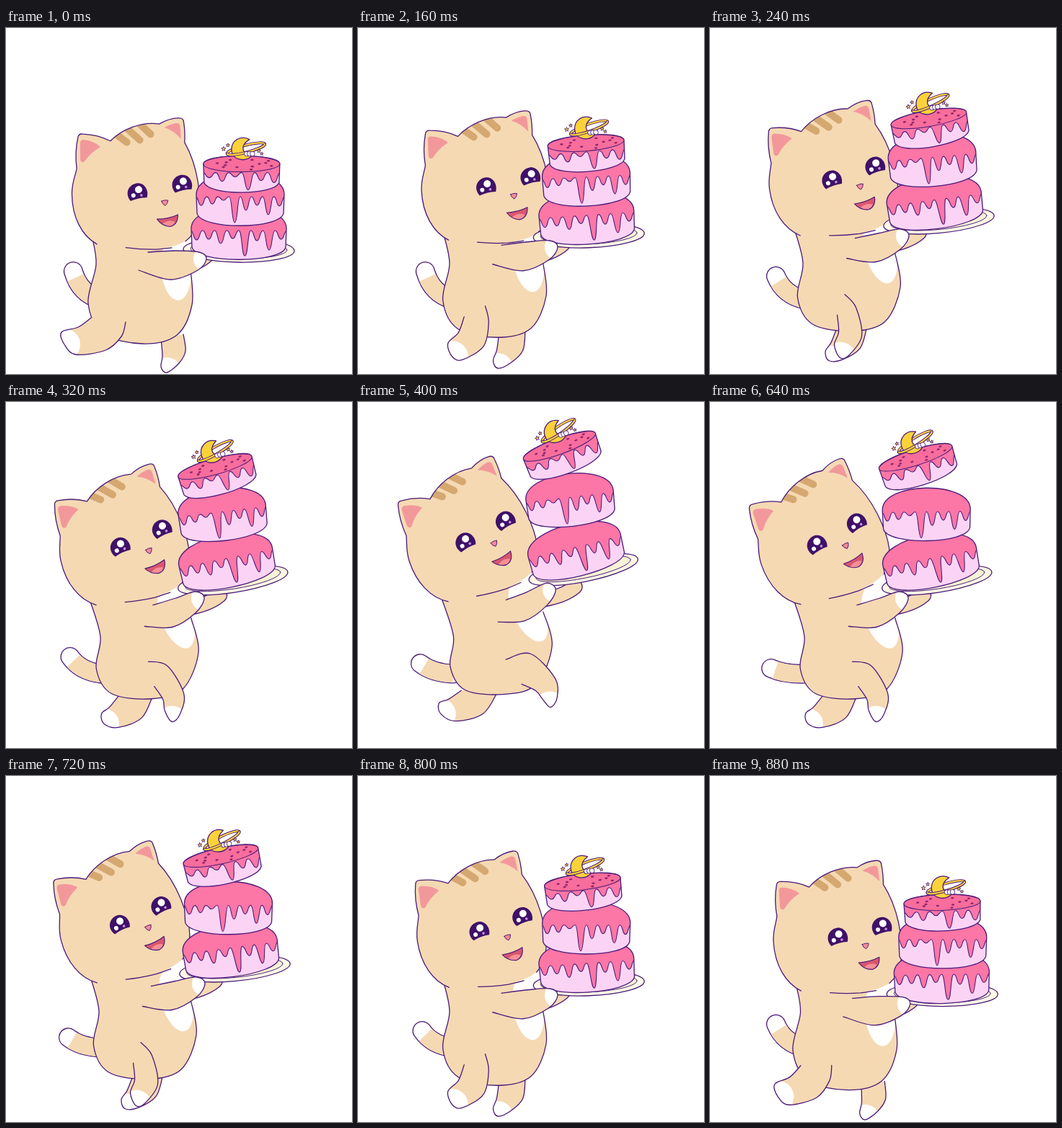
Write an HTML page with a canvas that moves like this. It is 480 by 480 pixels and loops after 960 ms.

```html
<!DOCTYPE html>
<html lang="en">
<head>
<meta charset="utf-8">
<title>Cat with a cake</title>
<style>
  html, body { margin: 0; width: 100%; height: 100%; overflow: hidden; background: #fff; }
  canvas { display: block; width: 480px; height: 480px; }
</style>
</head>
<body>
<canvas id="stage" width="480" height="480"></canvas>
<script>
const g = document.getElementById('stage').getContext('2d');
const INK = '#4a1a78', FUR = '#f5d9b3', PINK = '#fc76a6', SPONGE = '#fbd4f5', GOLD = '#fcd23a';
const STEP = 80, COUNT = 12;

// Every part swings between a rest pose and a raised pose.
// Outlines are x, y pairs along a smooth line.
const body = {
  rest: [119, 288, 125, 328, 114, 382, 135, 424, 190, 438, 237, 426, 258, 384, 256, 335],
  raised: [115, 269, 133, 325, 129, 366, 150, 398, 205, 403, 248, 389, 270, 335, 257, 288]
};
const frontLeg = {
  rest: [118, 402, 100, 415, 77, 422, 81, 439, 97, 453, 138, 447, 160, 428, 166, 408],
  raised: [235, 390, 257, 395, 268, 403, 280, 414, 289, 400, 283, 374, 245, 343, 208, 357]
};
const backLeg = {
  rest: [215, 430, 217, 455, 215, 470, 223, 478, 240, 465, 249, 448, 246, 425],
  raised: [138, 398, 119, 408, 105, 412, 107, 427, 128, 439, 168, 430, 190, 400]
};
const arm = {
  rest: [197, 311, 235, 309, 268, 311, 278, 320, 266, 336, 228, 349, 184, 336],
  raised: [206, 272, 235, 260, 261, 247, 274, 256, 262, 278, 232, 300, 195, 303]
};
const tail = { rest: [94, 335, 102, 368], raised: [84, 372, 104, 379] };
const farHand = { rest: [278, 316], raised: [303, 252] };

// x, y, angle in degrees
const neck = { rest: [119, 290], raised: [115, 268] };
const chest = { rest: [236, 333, -4], raised: [236, 288, -28] };
const plate = { rest: [323, 308, 1], raised: [312, 227, -12] };
const lowTier = { rest: [323, 284, 0], raised: [300, 199, -15] };
const midTier = { rest: [325, 237], raised: [292, 128] };
const topTier = { rest: [327, 204, 0], raised: [280, 62, -22] };

const headLine = new Path2D('M126 300C105 288 92 262 92 230C92 214 97 205 99 195C97 178 98 165 101 152Q102 146 108 147Q129 148 146 157C162 141 190 130 214 134Q228 126 241 126Q248 126 248 132Q250 145 249 160C259 178 264 195 267 215C272 250 270 282 249 297M166 305Q186 308 208 308Q222 307 230 306');
const headFill = new Path2D('M126 300C105 288 92 262 92 230C92 214 97 205 99 195C97 178 98 165 101 152Q102 146 108 147Q129 148 146 157C162 141 190 130 214 134Q228 126 241 126Q248 126 248 132Q250 145 249 160C259 178 264 195 267 215C272 250 270 282 249 297Q232 306 208 308Q160 308 126 300Z');
const innerEars = new Path2D('M104 160Q104 155 109 155Q124 157 132 165Q118 173 110 185Q105 188 104 182ZM221 139Q230 134 238 133Q242 133 243 137L244 155Q234 143 221 139Z');
const stripes = new Path2D('M148 143L169 159M163 134L187 156M181 128L202 148');
const eye = new Path2D('M-11 10C-18 -2 -10 -13 1 -13C12 -13 17 0 12 9Q1 7 -11 10Z');
const mouth = new Path2D('M-11 23Q5 23 18 17Q18 31 7 33.5Q-4 33 -11 23Z');
const tongue = new Path2D('M-4 30Q4 23 14 27Q11 33 6 33Q0 33 -4 30Z');
const nose = new Path2D('M-4.5 -2Q0 -4 4.5 -3Q4 2 .5 4.5Q-4 2 -4.5 -2Z');
const drum = w => new Path2D(`M${-w} -6C${-w} -46 ${w} -46 ${w} -6L${w - 1} 20C${w - 6} 43 ${6 - w} 43 ${1 - w} 20Z`);
const disc = new Path2D('M-53 -15C-53 -30 53 -30 53 -15L52 11C45 29 -45 29 -52 11Z');
const crescent = new Path2D('M9 -13C-4 -20 -16 -11 -16 1C-16 15 2 20 13 9C6 9 0 5 0 -1C0 -6 4 -10 9 -13Z');

// 0 at rest, 1 half a cycle later
const wave = f => (1 - Math.cos(2 * Math.PI * f / COUNT)) / 2;
const pose = (part, t) => part.rest.map((a, i) => a + (part.raised[i] - a) * t);

// The paw (fourth point) dips at mid-swing, points further up follow less
function stride(leg, t, dip) {
  const low = 4 * t * (1 - t) * dip;
  return pose(leg, t).map((v, i) => i % 2 ? v + low * Math.cos(((i - 1) / 2 - 3) / 2) : v);
}

function smooth(p) {
  const path = new Path2D(), last = p.length / 2 - 1;
  const x = i => p[2 * Math.max(0, Math.min(last, i))];
  const y = i => p[2 * Math.max(0, Math.min(last, i)) + 1];
  path.moveTo(x(0), y(0));
  for (let i = 0; i < last; i++) {
    path.bezierCurveTo(x(i) + (x(i + 1) - x(i - 1)) / 6, y(i) + (y(i + 1) - y(i - 1)) / 6,
      x(i + 1) - (x(i + 2) - x(i)) / 6, y(i + 1) - (y(i + 2) - y(i)) / 6, x(i + 1), y(i + 1));
  }
  return path;
}

function fill(path, color) { g.fillStyle = color; g.fill(path); }
function line(path, color = INK, width = 1.3) {
  g.strokeStyle = color;
  g.lineWidth = width;
  g.stroke(path);
}
function oval(x, y, rx, ry = rx, turn = 0, from = 0, to = 2 * Math.PI) {
  const path = new Path2D();
  path.ellipse(x, y, rx, ry, turn, from, to);
  return path;
}
function inside(path, draw) { g.save(); g.clip(path); draw(); g.restore(); }
function place([x, y, deg = 0], draw) {
  g.save();
  g.translate(x, y);
  g.rotate(deg * Math.PI / 180);
  draw();
  g.restore();
}

// Limb with a white paw around its fourth point
function limb(p, r) {
  const path = smooth(p);
  fill(path, FUR);
  inside(path, () => fill(oval(p[6], p[7], r), '#fff'));
  line(path);
}

function drawTail([x, y, bx, by]) {
  const path = new Path2D(), root = new Path2D();
  const along = (a, b, c, t) => (1 - t) * (1 - t) * a + 2 * t * (1 - t) * b + t * t * c;
  path.moveTo(132, 377);
  path.quadraticCurveTo(bx, by, x, y);
  for (let t = 0; t < 0.87; t += 0.05) root.lineTo(along(132, bx, x, t), along(377, by, y, t));
  line(path, INK, 27);
  line(path, '#fff', 24.4);
  g.lineCap = 'butt';
  line(root, FUR, 24.4);
  g.lineCap = 'round';
}

function drawFarArm([x, y]) {
  const path = new Path2D();
  path.moveTo(x - 45, y + 18);
  path.quadraticCurveTo(x - 15, y + 13, x, y);
  line(path, INK, 21);
  line(path, FUR, 18.4);
}

function drawBody(lift) {
  const outline = smooth(pose(body, lift)), torso = new Path2D(outline);
  torso.lineTo(180, 230); // reaches up behind the head
  fill(torso, FUR);
  inside(torso, () => place(pose(chest, lift), () => fill(oval(0, 0, 21, 45), '#fff')));
  line(outline);
}

// The markings slide sideways as the head turns
function drawHead(turn) {
  g.translate(-119, -290);
  fill(headFill, FUR);
  inside(headFill, () => place([-7 * turn, 0], () => line(stripes, '#d4a870', 10)));
  fill(innerEars, '#f2989b');
  line(headLine);
  place([221 - 11 * turn, 243], drawFace);
}

function drawFace() {
  for (const at of [[-38, -14, -9], [24, -25, -9]]) {
    place(at, () => {
      fill(eye, '#3f1168');
      fill(oval(2.5, -4, 5), '#fff');
      fill(oval(-6, 3, 3), '#fff');
      fill(oval(5, 4.5, 1.8), '#c58fe0');
    });
  }
  fill(nose, '#f58a94');
  line(nose, INK, 0.9);
  fill(mouth, '#d9566f');
  fill(tongue, '#f58f95');
  line(mouth, INK, 1.1);
}

// Evenly spaced drips of the given lengths
function tier(shape, w, drips) {
  const icing = new Path2D(), dx = w / drips.length, bend = dx * 0.55;
  icing.moveTo(-w, -3);
  drips.forEach((drop, i) => {
    const x = -w + 2 * dx * i;
    icing.bezierCurveTo(x + bend, -3, x + dx - bend, drop, x + dx, drop);
    icing.bezierCurveTo(x + dx + bend, drop, x + 2 * dx - bend, -3, x + 2 * dx, -3);
  });
  icing.lineTo(w, -60);
  icing.lineTo(-w, -60);
  icing.closePath();
  fill(shape, SPONGE);
  inside(shape, () => {
    fill(icing, PINK);
    line(icing, INK, 1.1);
  });
  line(shape);
}

function drawTop() {
  const lid = oval(0, -15, 53, 11);
  tier(disc, 54, [4, 9, 3, 21, 8, 11]);
  fill(lid, '#f76d9c');
  line(lid, INK, 1);
  for (let i = 0; i < 14; i++) {
    const a = i * 2.4, r = 0.5 + 0.2 * (i % 3);
    fill(oval(49 * r * Math.cos(a), -15 + 9 * r * Math.sin(a), 2.2, 1.3), '#92286f');
  }
  place([2, -36], drawMoon);
}

function star(x, y, r) {
  const path = new Path2D();
  for (let i = 0; i < 10; i++) {
    const a = i * Math.PI / 5 - Math.PI / 2, d = i % 2 ? r * 0.45 : r;
    path.lineTo(x + d * Math.cos(a), y + d * Math.sin(a));
  }
  path.closePath();
  fill(path, GOLD);
  line(path, INK, 0.8);
}

function ring(from, to) {
  const path = oval(4, 0, 27, 5, -0.25, from, to);
  line(path, INK, 4);
  line(path, GOLD, 2.2);
}

function drawMoon() {
  ring(0, 2 * Math.PI);
  fill(crescent, GOLD);
  line(crescent);
  ring(0.1, Math.PI - 0.1);
  for (const x of [5, 9, 13]) {
    const puff = oval(x, 7, 2.8);
    line(puff, INK, 1.6);
    fill(puff, '#fff');
  }
  star(-27, 0, 3.2);
  star(-21, -5, 2.6);
  star(22, 3, 2.8);
  star(26, 7, 2.4);
}

function drawPlate() {
  const rim = oval(0, 0, 77, 17), well = oval(0, -1, 67, 13);
  fill(rim, '#fdf9e6');
  line(rim);
  fill(well, '#f8f2d6');
  line(well, INK, 0.9);
}

function draw(f) {
  // The head, tail and cake top trail behind the jump
  const lift = wave(f), sway = wave(f - 0.6), wag = wave(f - 1), lean = wave(f - 0.2);
  const tilt = -7 * wave(f + 1.5) ** 2;

  g.clearRect(0, 0, 480, 480);
  g.lineCap = g.lineJoin = 'round';

  drawTail(pose(tail, wag));
  limb(stride(backLeg, lift, 9), 21);
  drawFarArm(pose(farHand, lift));
  drawBody(lift);
  limb(stride(frontLeg, lift, 31), 22);
  place([...pose(neck, lift), -21.5 * sway], () => drawHead(sway));

  place(pose(plate, lift), drawPlate);
  place(pose(lowTier, lift), () => tier(drum(66), 67, [10, 9, 15, 8, 32, 11, 24, 9]));
  place([...pose(midTier, lift), tilt], () => tier(drum(61), 62, [9, 7, 2, 33, 16, 9, 22, 10]));
  place(pose(topTier, lean), drawTop);
  limb(pose(arm, lift), 18);
}

let shown = -1;
function tick() {
  const f = Math.floor(performance.now() / STEP) % COUNT;
  if (f !== shown) draw(shown = f);
  requestAnimationFrame(tick);
}
tick();
</script>
</body>
</html>
```
